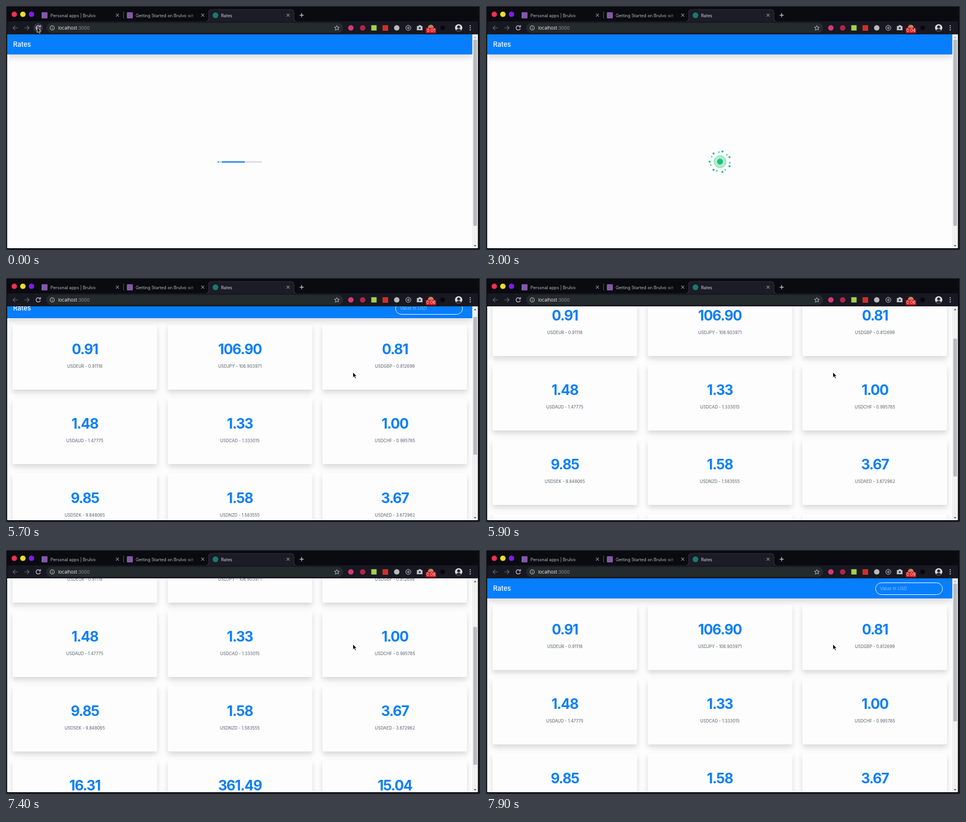
Recreate the animation shown at these times as an HTML page. Size 800x413 px, loop 8000 ms.

```html
<!DOCTYPE html>
<html lang="en">
<head>
<meta charset="utf-8">
<title>Rates</title>
<style>
html, body { margin: 0; width: 100%; height: 100%; overflow: hidden; background: #06080c; }
body { font-family: Inter, "Open Sans", sans-serif; }
svg, #view, #page, #page div { position: absolute; }
svg { left: 0; top: 0; }
#view { left: 2px; top: 48px; width: 785px; height: 362px; overflow: hidden; background: #fefdfe; }
#page { left: 0; top: 0; width: 785px; height: 536px; }
#page .bar { left: 0; top: 0; width: 785px; height: 34px; background: #077efb; box-shadow: 0 5px 10px rgba(0, 0, 0, .15); }
#page .title { left: 10px; top: 7px; line-height: 20px; font-size: 11.3px; font-weight: 500; color: #fff; }
#page .field { left: 655px; top: 7px; width: 105px; height: 19px; padding-left: 7px; border: 1px solid #e3f1ff; border-radius: 11px;
  font-size: 7.4px; line-height: 19px; color: #86c0fa; }
#page .card { width: 244px; height: 111px; background: #fefdfe; border-radius: 2px; text-align: center;
  box-shadow: 0 5px 10px rgba(0, 0, 0, .15); }
.card b { position: absolute; left: 0; right: 0; top: 28px; line-height: 30px; font-size: 23.7px; letter-spacing: -1.1px; color: #0b7ff5; }
.card span { position: absolute; left: 0; right: 0; top: 67px; line-height: 10px; font-size: 7px; font-weight: 500; color: #6c757d; }
</style>
</head>
<body>
<svg width="800" height="413" viewBox="0 0 800 413">
  <defs>
    <linearGradient id="fade" x1="0" x2="1"><stop stop-color="#090b10" stop-opacity="0"/><stop offset="1" stop-color="#090b10"/></linearGradient>
  </defs>
  <path fill="#090b10" d="M0 0H800V26H0Z"/>
  <path fill="#171821" d="M2 26H797V48H2Z"/>
  <rect x=".5" y=".5" width="799" height="412" fill="none" stroke="#2b2e34"/>
  <path fill="#1b1c28" stroke="#34364a" stroke-width=".8" d="M338 26Q342 26 342 22V10Q342 6 346 6H482Q486 6 486 10V22Q486 26 490 26"/>
  <circle cx="14" cy="14" r="4.6" fill="#ee3148"/>
  <circle cx="28.5" cy="14" r="4.6" fill="#f1dc22"/>
  <circle cx="43" cy="14" r="4.6" fill="#7d1fe0"/>
  <g fill="#8258a8"><rect x="60" y="10.5" width="10" height="10.5" rx="1"/><rect x="204" y="10.5" width="10" height="10.5" rx="1"/></g>
  <circle cx="353.5" cy="15.8" r="4.8" fill="#167e68"/>
  <g font-size="7.2" fill="#b6b9c2">
    <text x="75" y="18.5">Personal apps | Brulvo</text>
    <text x="219" y="18.5">Getting Started on Brulvo wit</text>
    <text x="363" y="18.5" fill="#d4d6de">Rates</text>
  </g>
  <rect x="304" y="9" width="21" height="14" fill="url(#fade)"/>
  <path stroke="#50535d" d="M198.5 10V21"/>
  <g id="closes" stroke="#b6b9c2" fill="none"></g>
  <path stroke="#dcdee4" stroke-width="1.1" d="M495.5 15.5H502.5M499 12V19"/>

  <circle id="hover" cx="54.5" cy="37" r="8" fill="#30333d"/>
  <g fill="none" stroke="#666973" stroke-width="1.1">
    <path d="M20 37H12M15.5 33.3L11.8 37L15.5 40.7M31 37H39M35.5 33.3L39.2 37L35.5 40.7"/>
    <path stroke="#d6d8df" d="M57 34.3A3.7 3.7 0 1 0 58 38M58.2 32.5V35.5H55.2"/>
  </g>
  <rect x="68" y="28.5" width="501" height="17" rx="8.5" fill="#252a2d"/>
  <g fill="none" stroke="#c3c6cc" stroke-width=".9">
    <circle cx="78" cy="37" r="3.7"/><path d="M78 36.5V39.2M78 34.7V35.5"/>
    <path stroke-linejoin="round" d="M558.5 33L559.7 35.7L562.6 36L560.4 37.9L561.1 40.8L558.5 39.3L555.9 40.8L556.6 37.9L554.4 36L557.3 35.7Z"/>
  </g>
  <text x="88" y="39.8" font-size="7.55" fill="#e0e2e6">localhost<tspan fill="#8b9097">:3000</tspan></text>

  <circle cx="582" cy="37" r="4.6" fill="#d43a78"/>
  <circle cx="602" cy="37" r="4.6" fill="#b32745"/>
  <rect x="616.5" y="32.5" width="9" height="9" fill="#a5cf49"/>
  <rect x="635.5" y="32.5" width="9.5" height="9.5" fill="#cf302c"/>
  <circle cx="659.5" cy="37" r="4.6" fill="#b9bbbf"/>
  <g fill="none" stroke="#bfc1c6"><circle cx="679" cy="37" r="4.2"/><circle cx="679" cy="37" r="1.4"/></g>
  <path fill="#c4c6cb" d="M693.5 34H696L697 32.5H700L701 34H703V41H693.5Z"/><circle cx="698.3" cy="37.4" r="1.8" fill="#41444d"/>
  <circle cx="717" cy="36.5" r="4.8" fill="#b58b55"/>
  <circle cx="737" cy="37" r="4" fill="#07080b"/>
  <rect x="708.5" y="37" width="17.5" height="9" rx="1.5" fill="#df0b18"/>
  <text id="clock" x="717.2" y="44" font-size="7" fill="#fff" text-anchor="middle"></text>
  <circle cx="764" cy="37" r="6.2" fill="#d8d8d8"/>
  <path fill="#22242a" d="M761.5 35.5A2.5 2.5 0 0 1 766.5 35.5A2.5 2.5 0 0 1 761.5 35.5M759.3 41Q764 36 768.7 41Q764 45 759.3 41"/>
  <g fill="#d6d8df"><circle cx="783.5" cy="33.5" r="1"/><circle cx="783.5" cy="37" r="1"/><circle cx="783.5" cy="40.5" r="1"/></g>

  <rect x="787" y="48" width="9.5" height="362" fill="#f1f1f2"/>
  <path id="up" d="M789.5 54.5L791.8 52L794 54.5Z"/>
  <path id="down" d="M789.5 404.8L791.8 407.3L794 404.8Z"/>
  <rect id="thumb" x="788.7" width="6.3" fill="#bbbbbe"/>
</svg>

<div id="view">
  <div id="page">
    <div id="cards"></div>
    <div class="bar"><div class="title">Rates</div><div class="field" id="field">Value in USD</div></div>
  </div>
</div>

<svg width="800" height="413" viewBox="0 0 800 413">
  <defs><clipPath id="lane"><rect x="357" y="262.8" width="75" height="2.5" rx="1.2"/></clipPath></defs>
  <g id="loader">
    <rect id="track" y="262.8" height="2.5" rx="1.2" fill="#d9dadd"/>
    <g clip-path="url(#lane)" fill="#1580e4"><rect id="run" y="262.8" width="39" height="2.5" rx="1"/><rect id="tail" y="262.8" width="2.5" height="2.5" rx="1"/></g>
    <circle id="halo" cx="395" cy="263.5" fill="#b5ecd0" stroke="#35c988" stroke-width=".7"/>
    <circle id="core" cx="395" cy="263.5" fill="#1cc277"/>
    <path id="tick" d="M390.5 263.5L393.8 266.8L399.8 260.5" fill="none" stroke="#fff" stroke-width="1.8"/>
    <g id="burst" fill="#22c47c"></g>
  </g>
  <path id="cursor" d="M0 0V9L2.1 7.2L3.6 10.4L5.2 9.7L3.8 6.6H6.5Z" fill="#0a0a0a" stroke="#fff" stroke-width=".7"/>
</svg>

<script>
const $ = id => document.getElementById(id);
const set = (id, attrs) => { for (const k in attrs) $(id).setAttribute(k, attrs[k]); };
const show = (id, on) => { $(id).style.display = on ? '' : 'none'; };
const ramp = (t, from, to) => Math.min(1, Math.max(0, (t - from) / (to - from)));
const easeOut = p => 1 - (1 - p) ** 2;

const rates = ['EUR 0.91118', 'JPY 106.903971', 'GBP 0.812699', 'AUD 1.47775', 'CAD 1.333015', 'CHF 0.995785',
  'SEK 9.848065', 'NZD 1.583555', 'AED 3.672962', 'EGP 16.306898', 'NGN 361.494136', 'ZAR 15.03525'];
$('cards').innerHTML = rates.map((rate, i) => {
  const [code, value] = rate.split(' ');
  const left = 9 + i % 3 * 261.7, top = 44 + Math.floor(i / 3) * 126;
  return `<div class="card" style="left:${left}px;top:${top}px"><b>${(+value).toFixed(2)}</b><span>USD${code} - ${value}</span></div>`;
}).join('');
$('closes').innerHTML = [188, 332, 476].map(x => `<path d="M${x - 2.5} 13L${x + 2.5} 18M${x + 2.5} 13L${x - 2.5} 18"/>`).join('');

// Piecewise linear track of [time, value] pairs
function track(keys, t) {
  let i = 1;
  while (i < keys.length - 1 && t > keys[i][0]) i++;
  const [t0, a] = keys[i - 1], [t1, b] = keys[i];
  return a + (b - a) * ramp(t, t0, t1);
}
const scrollKeys = [[5600, 0], [5700, 14], [5900, 71], [6100, 134], [6200, 160], [6300, 175],
  [7100, 175], [7200, 165], [7400, 114], [7600, 57], [7700, 30], [7800, 9], [7900, 0]];

function drawLoader(t) {
  show('loader', t < 3700);
  const half = 37.5 * (1 - ramp(t, 2300, 2600));
  set('track', { x: 394.5 - half, width: half * 2 });
  const x = 318 + (t / 1200 * 114 + 46) % 114;
  set('run', { x });
  set('tail', { x: x - 7 });
  show('run', t < 2300);
  show('tail', t < 2300);
  set('halo', { r: 10 * ramp(t, 2450, 2700) });
  show('halo', t > 2450);
  set('core', { r: 10 * ramp(t, 2700, 3300) });
  set('tick', { opacity: ramp(t, 3100, 3400) });
  const p = ramp(t, 2700, 3500), reach = 29 * easeOut(p), size = 1 - Math.max(0, p - .4) / .6;
  let dots = '';
  for (let i = 0; i < 14; i++) {
    const big = i % 2;
    const angle = (Math.floor(i / 2) * 360 / 7 - (big ? 77 : 97)) * Math.PI / 180;
    const d = reach * (big ? 1 : .93);
    dots += `<circle cx="${395 + d * Math.cos(angle)}" cy="${263.5 + d * Math.sin(angle)}" r="${(big ? 1.8 : 1.2) * size}"/>`;
  }
  $('burst').innerHTML = p > 0 ? dots : '';
}

function drawPage(t) {
  const loaded = t >= 3700, scroll = track(scrollKeys, t);
  $('page').style.transform = `translateY(${-scroll}px)`;
  $('cards').style.opacity = ramp(t, 3600, 4000);
  show('cards', loaded);
  show('field', loaded);
  const scale = 345 / 536;
  set('thumb', { y: 57 + scroll * scale, height: loaded ? 362 * scale : 315 });
  set('up', { fill: scroll > 0 ? '#505257' : '#a5a6aa' });
  set('down', { fill: scroll < 175 ? '#505257' : '#a5a6aa' });
}

function drawCursor(t) {
  const out = easeOut(ramp(t, 0, 800)), into = easeOut(ramp(t, 4500, 5000));
  const [x, y] = t < 4600 ? [52.5 + 727 * out, 36 + 134 * out] : [619.5 - 34 * into, 439.5 - 280 * into];
  show('cursor', t < 800 || t >= 4600);
  set('cursor', { transform: `translate(${x} ${y})` });
  show('hover', t < 100);
}

function frame() {
  const t = Math.floor(performance.now() % 8000 / 100) * 100;
  $('clock').textContent = '0:0' + (t < 5000 || t >= 6000 ? 1 + Math.floor((t + 100) / 1000) : 6);
  drawLoader(t);
  drawPage(t);
  drawCursor(t);
  requestAnimationFrame(frame);
}
frame();
</script>
</body>
</html>
```
